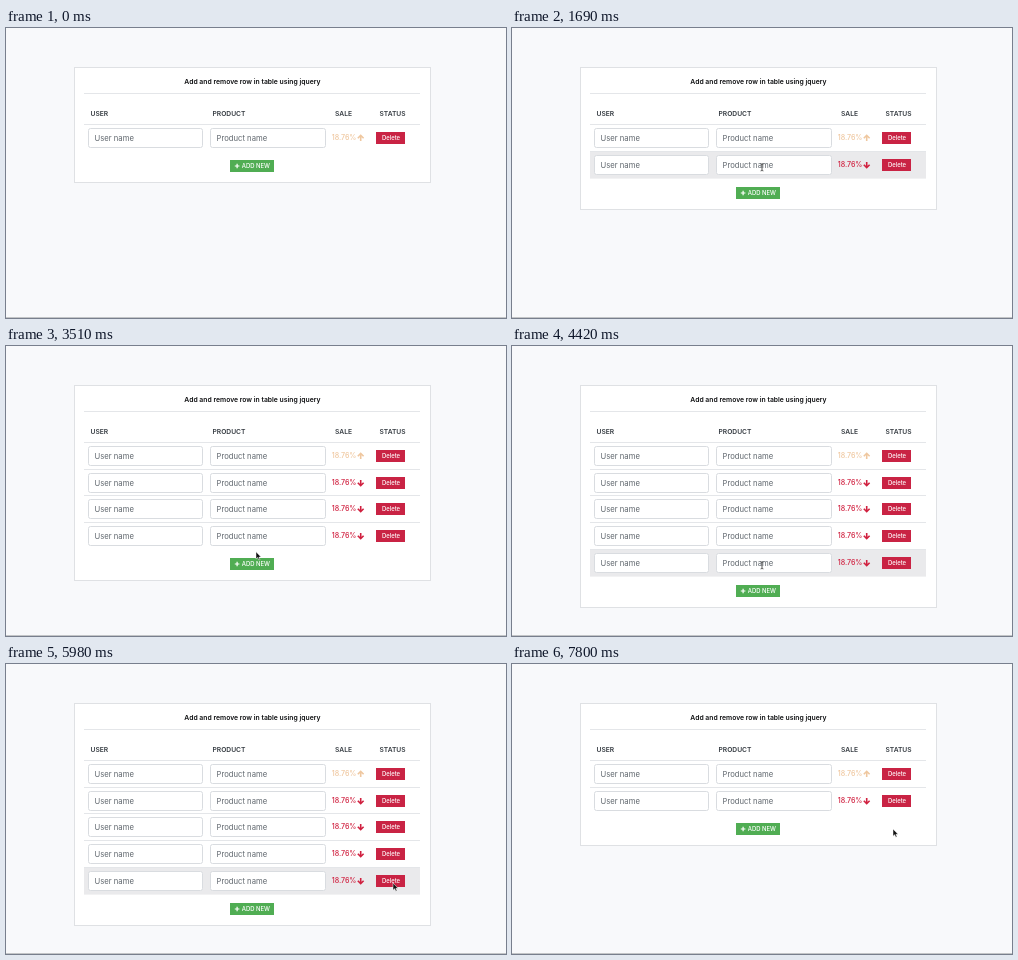
Recreate the animation shown at these times as an HTML page. Size 500x290 px, loop 8000 ms.

```html
<!DOCTYPE html>
<html lang="en">
<head>
<meta charset="utf-8">
<title>Add and remove rows</title>
<style>
  html, body { margin: 0; width: 100%; height: 100%; overflow: hidden; background: #f8f9fb; }
  svg { display: block; width: 500px; height: 290px; font-family: Inter, Roboto, sans-serif; }
  .title { font-size: 6.82px; font-weight: 600; fill: #0c0d0f; text-anchor: middle; }
  .head { font-size: 6.7px; font-weight: 600; fill: #343a40; }
  .line { stroke: #e4e6e9; }
  .card { fill: #fff; stroke: #dfe1e4; }
  .field { fill: #fff; stroke: #d9dce0; }
  .hint { font-size: 7.7px; fill: #60676e; }
  .sale { font-size: 7.1px; font-weight: 500; }
  .arrow { fill: none; stroke-width: 1.6; }
  .label { font-size: 5.9px; font-weight: 500; fill: #fff; }
  .hover { fill: #eaeaec; }
</style>
</head>
<body>
<svg viewBox="0 0 500 290">
  <rect width="500" height="290" fill="#f8f9fb"/>
  <path d="M0 289.5H500" stroke="#c3c5c7"/>
  <rect id="card" class="card" x="68.5" y="39.5" width="356"/>
  <text class="title" x="246.4" y="56">Add and remove row in table using jquery</text>
  <path class="line" d="M78 65.5H414"/>
  <g class="head">
    <text x="84.5" y="88">USER</text>
    <text x="206.5" y="88">PRODUCT</text>
    <text x="329" y="88">SALE</text>
    <text x="373.5" y="88">STATUS</text>
  </g>
  <g id="rows"></g>
  <g id="add">
    <rect x="224" y="132" width="44" height="12" fill="#50ad53"/>
    <path d="M228.8 138h4.6M231.1 135.7v4.6" stroke="#fff" stroke-width="1.2"/>
    <text class="label" x="235.8" y="140.3">ADD NEW</text>
  </g>
  <g id="cursor">
    <path id="pointer" d="M0 0V7.2L1.7 5.7 2.8 8.2 4 7.7 2.9 5.3H5.1Z" fill="#111" stroke="#fff" stroke-width=".5"/>
    <path id="beam" d="M-1.4-3.6Q0-3.6 0-2.6V2.6Q0 3.6-1.4 3.6M1.4-3.6Q0-3.6 0-2.6M0 2.6Q0 3.6 1.4 3.6" fill="none" stroke="#333" stroke-width=".8"/>
  </g>
</svg>
<script>
const LOOP = 8000, STEP = 130, TRAVEL = 520, LEAD = 650, ENTER = 260;
const TOP = 97, MAX_ROWS = 5;

const $ = id => document.getElementById(id);
const show = (el, on) => el.style.visibility = on ? "visible" : "hidden";
const shift = (el, x, y) => el.setAttribute("transform", `translate(${x} ${y})`);
const rowOffset = i => Math.round(i * 26.65);
const overAdd = rows => [250, 139.3 + rowOffset(rows - 1)];
const overDelete = i => [375 + 3 * i, 112 + rowOffset(i)];

// The cursor sets off `lead` ms before each click, which changes the row count.
const add = (at, lead = LEAD) => ({ at, lead, change: 1, spot: overAdd });
const removeLast = (at, lead = LEAD) => ({ at, lead, change: -1, spot: rows => overDelete(rows - 1) });
const pointAt = (at, i) => ({ at, lead: LEAD, change: 0, spot: () => overDelete(i) });

const actions = [
  add(650), add(2340), add(3250), add(4160, 910),
  pointAt(5070, 2),
  removeLast(6110, 780), removeLast(6890), removeLast(7800)
];

function stateAt(t) {
  let count = 1, x = 252, y = 240;
  for (const { at, lead, change, spot } of actions) {
    const k = Math.min(1, Math.max(0, (t - at + lead) / TRAVEL));
    const ease = k * k * (3 - 2 * k);
    const [toX, toY] = spot(count);
    x += (toX - x) * ease;
    y += (toY - y) * ease;
    if (t < at) break;
    count += change;
  }
  return { count, x, y };
}

function rowMarkup(_, i) {
  const color = i ? "#d0203f" : "#efc79f";
  const arrow = i ? "M354.7 107v5.4M351.8 109.8l2.9 2.9 2.9-2.9" : "M354.7 113v-5.4M351.8 110.2l2.9-2.9 2.9 2.9";
  const field = (x, w, hint) => `<rect class="field" x="${x}" y="100.5" width="${w}" height="19" rx="2"/>
    <text class="hint" x="${x + 6}" y="113">${hint}</text>`;
  return `<g class="row" transform="translate(0 ${rowOffset(i)})">
    <rect class="hover" x="78" y="${TOP}" width="336" height="26.6"/>
    <path class="line" d="M78 96.5H414"/>
    ${field(82.5, 114, "User name")}${field(204.5, 115, "Product name")}
    <text class="sale" x="325.7" y="112.3" fill="${color}">18.76%</text>
    <path class="arrow" d="${arrow}" stroke="${color}"/>
    <rect x="370" y="104" width="29" height="12" fill="#c92344"/>
    <text class="label" x="376" y="112.2">Delete</text></g>`;
}

$("rows").innerHTML = Array.from({ length: MAX_ROWS }, rowMarkup).join("");
const rows = [...document.querySelectorAll(".row")];

function draw(now) {
  const t = Math.floor((now % LOOP) / STEP) * STEP;
  const { count, x, y } = stateAt(t);
  const visible = t >= ENTER;
  const inside = (i, from, to) => visible && y >= from + rowOffset(i) && y < to + rowOffset(i);
  let typing = false;

  rows.forEach((row, i) => {
    const present = i < count;
    row.style.display = present ? "" : "none";
    show(row.firstElementChild, present && inside(i, TOP, TOP + 26.6));
    typing ||= present && x > 204 && x < 320 && inside(i, 100, 120);
  });
  $("card").setAttribute("height", 115 + rowOffset(count - 1));
  shift($("add"), 0, rowOffset(count - 1));
  shift($("cursor"), x, y);
  show($("pointer"), visible && !typing);
  show($("beam"), visible && typing);
}

const start = performance.now();
(function tick() {
  draw(performance.now() - start);
  requestAnimationFrame(tick);
})();
</script>
</body>
</html>
```
